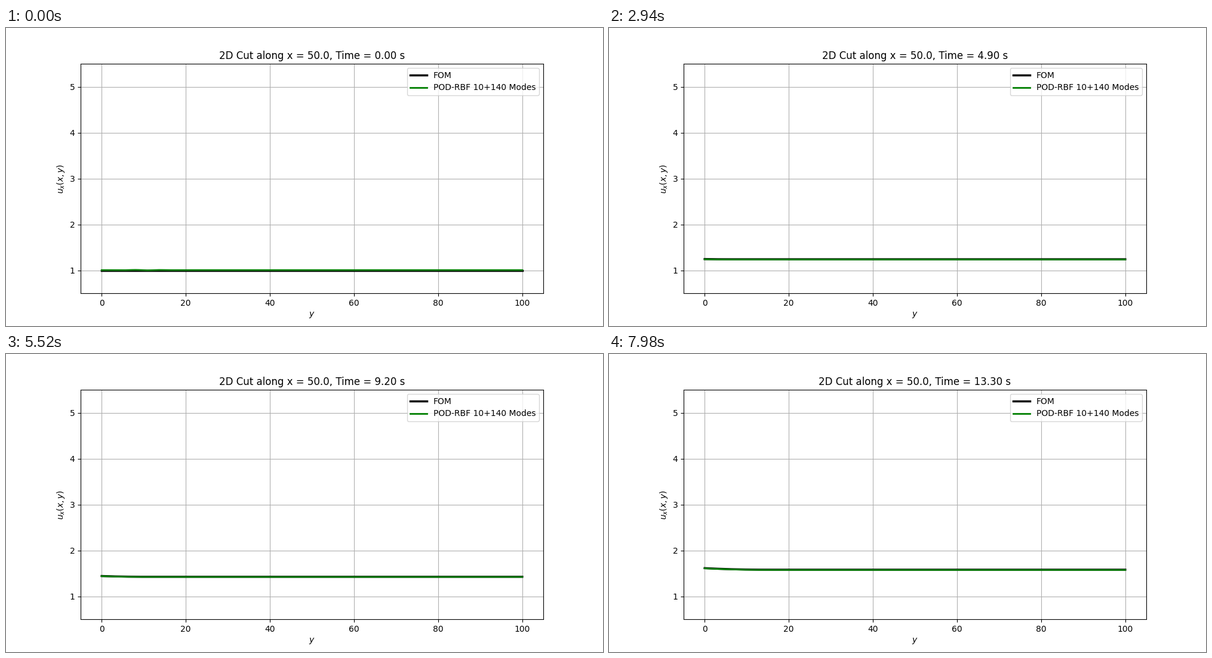
Write a matplotlib script that moves like this. It is 1000 px wide and 500 px high and loops after 8 s.

```python
import numpy as np
import matplotlib.pyplot as plt
from matplotlib.animation import FuncAnimation

TICK = 20      # ms per drawn frame
STEP = 30      # ms per solver step
DT = 0.05      # simulated seconds per step
LOOP = 8000

y = np.linspace(0, 100, 250)


def full_model(t):
    """Slowly rising plateau with a growing layer near y = 0."""
    level = 1 + 0.0522 * t - 0.00065 * t**2
    width = 1.1 * t + 1e-6
    layer = 0.00019 * t**2 * np.clip(1 - y / width, 0, 1) ** 2
    return level + layer


def reduced_model(t):
    """Full model plus a small reconstruction error."""
    bias = np.interp(t, [0, 1.8, 3.1, 4.9, 7.65, 10.75, 13.3],
                     [0.004, 0, -0.002, -0.006, -0.005, -0.001, -0.005])
    ripple = 0.005 * np.sin(y) * np.exp(-((y - 10) / 5) ** 2)
    return full_model(t) + bias + ripple * np.exp(-t / 0.4)


fig, ax = plt.subplots(figsize=(10, 5), dpi=100)
fom, = ax.plot(y, full_model(0), color="black", lw=2.5, label="FOM")
rom, = ax.plot(y, reduced_model(0), color="green", lw=2,
               label="POD-RBF 10+140 Modes")
ax.set_xlim(-5, 105)
ax.set_ylim(0.5, 5.5)
ax.set_xlabel("$y$")
ax.set_ylabel("$u_x(x,y)$")
ax.grid(True)
ax.legend(loc="upper right")
title = ax.set_title("")


def update(i):
    t = (i * TICK + STEP - TICK) // STEP * DT
    fom.set_ydata(full_model(t))
    rom.set_ydata(reduced_model(t))
    title.set_text(f"2D Cut along x = 50.0, Time = {t:.2f} s")
    return fom, rom, title


anim = FuncAnimation(fig, update, frames=LOOP // TICK, interval=TICK,
                     repeat=True, repeat_delay=0)
plt.show()
```
